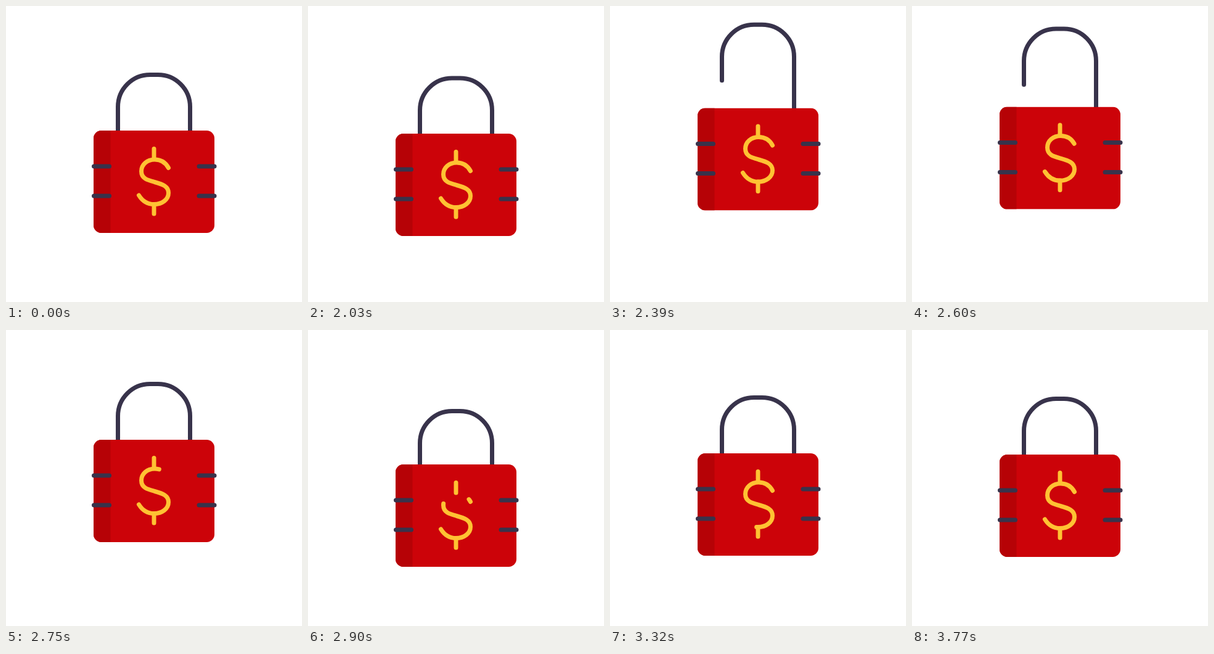
Recreate the animation shown at these times as an HTML page. Size 480 by 480 pixels, loop 3890 ms.

```html
<!DOCTYPE html>
<html lang="en">
<head>
<meta charset="utf-8">
<title>Padlock</title>
<style>
  html, body { margin: 0; width: 100%; height: 100%; overflow: hidden; background: #fff; }
  svg { display: block; width: 100%; height: 100%; }
  .line { fill: none; stroke-width: 7; stroke-linecap: round; stroke-linejoin: round; }
  .dark { stroke: #38334b; }
  .gold { stroke: #ffc233; }
</style>
</head>
<body>
<svg viewBox="0 0 480 480">
  <defs>
    <clipPath id="case"><rect x="142" y="202" width="196" height="166" rx="12.5"/></clipPath>
    <path id="curve" pathLength="1" d="M263.5 262.5C259 254 251 249 241 249C229 249 219.5 257 219.5 268
      C219.5 280 230 282.5 241 285.5C254 289 263.5 292.5 263.5 303
      C263.5 314 253 321.5 240 321.5C229 321.5 221 316 215.5 307"/>
  </defs>
  <path id="shackle" class="line dark" d="M181.5 202V163.5A52 52 0 0 1 233.5 111.5H246.5A52 52 0 0 1 298.5 163.5V270"/>
  <g id="body">
    <g clip-path="url(#case)">
      <rect x="142" y="202" width="196" height="166" fill="#cc0309"/>
      <rect x="142" y="202" width="27.5" height="166" fill="#b60206"/>
    </g>
    <path class="line dark" d="M142.5 260H167.5M142.5 308H167.5M313 260H338M313 308H338"/>
    <path class="line gold" d="M240 231.5V248M240 321.5V337"/>
    <use id="leaving" href="#curve" class="line gold"/>
    <use id="entering" href="#curve" class="line gold"/>
  </g>
</svg>
<script>
  const LOOP = 3890, HOLD = 2030, STEP = 30, LAST = 59;

  // Each track lists [step, value] knots.
  const bodyY = [[0, 0], [1, 5], [4.7, 16], [8, -9], [13, -36.5], [17, -40], [21, -37.4],
    [25, -24], [28, -3], [30, 16], [33, 11], [36, 3], [40, -4], [44, -2], [51, 0]];
  const shackleY = [[0, 0], [5, 4], [7.5, 0], [12, -44], [14, -45], [18, -44.5], [20, -36],
    [24, 0], [27, 0], [30, 4], [35, 0]];
  const erase = [[19, 0], [25, .11], [30, .31], [36, .65], [41, 1]];
  const draw = [[28, 0], [30, .025], [36, .3], [44, .85], [50, 1]];

  const slope = (a, b) => (b[1] - a[1]) / (b[0] - a[0]);

  // Flat at ends and turning points, harmonic mean elsewhere.
  function tangent(track, i) {
    if (i === 0 || i === track.length - 1) return 0;
    const l = slope(track[i - 1], track[i]), r = slope(track[i], track[i + 1]);
    return l * r <= 0 ? 0 : 2 * l * r / (l + r);
  }

  function sample(track, k) {
    if (k <= track[0][0]) return track[0][1];
    const i = track.findIndex(p => p[0] >= k);
    if (i < 0) return track[track.length - 1][1];
    const [x0, y0] = track[i - 1], [x1, y1] = track[i];
    const w = x1 - x0, u = (k - x0) / w, v = 1 - u;
    return y0 * (1 + 2 * u) * v * v + y1 * (3 - 2 * u) * u * u
      + w * u * v * (tangent(track, i - 1) * v - tangent(track, i) * u);
  }

  const el = id => document.getElementById(id);
  const body = el('body'), shackle = el('shackle'), leaving = el('leaving'), entering = el('entering');

  const shift = (node, y) => node.setAttribute('transform', `translate(0 ${y.toFixed(2)})`);

  function trim(node, from, to) {
    node.style.display = to > from ? '' : 'none';
    node.style.strokeDasharray = from <= 0 && to >= 1 ? 'none' : `${to - from} 2`;
    node.style.strokeDashoffset = -from;
  }

  function render(now) {
    const t = now % LOOP;
    const k = t < HOLD ? 0 : Math.min(LAST, 1 + Math.floor((t - HOLD) / STEP));
    const y = sample(bodyY, k);
    shift(body, y);
    shift(shackle, y + sample(shackleY, k));
    trim(leaving, sample(erase, k), 1);
    trim(entering, 0, sample(draw, k));
  }

  function tick(now) {
    render(now);
    requestAnimationFrame(tick);
  }
  render(0);
  requestAnimationFrame(tick);
</script>
</body>
</html>
```
